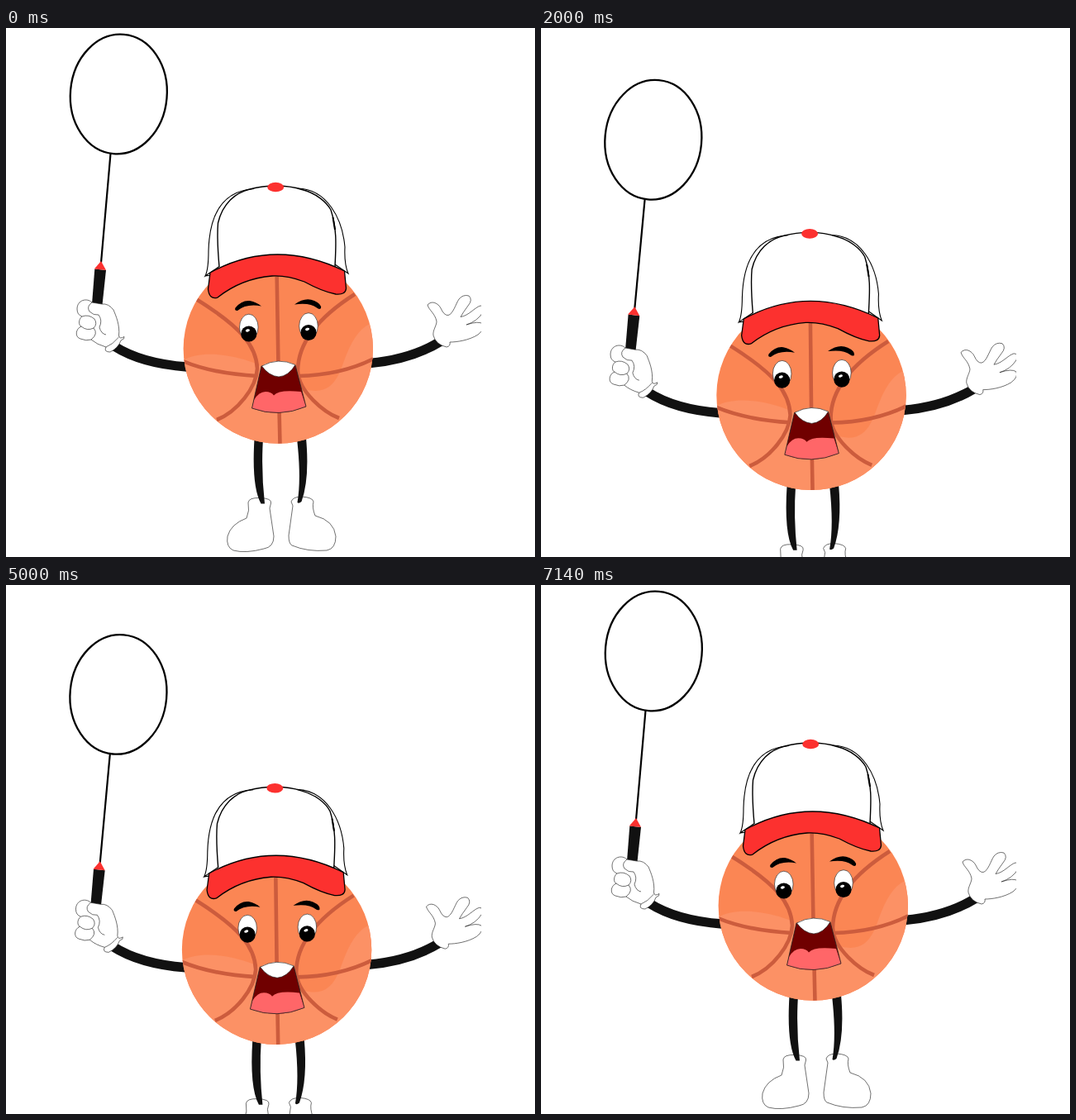
Recreate the animation shown at these times as an HTML page. Size 640 px wide and 640 px high, loop 7210 ms.

```html
<!DOCTYPE html>
<html lang="en">
<head>
<meta charset="utf-8">
<title>Basketball with a racket</title>
<style>
  html, body { margin: 0; width: 100%; height: 100%; overflow: hidden; background: #fff; }
  svg { display: block; width: 100%; height: 100%; }
  .thin { fill: #fff; stroke: #222; stroke-width: .65; }
  .limb { fill: none; stroke: #111; stroke-width: 11.5; }
  .seam { fill: none; stroke: #cc5c3d; stroke-width: 4.6; }
  .cap { fill: none; stroke: #000; stroke-width: 1.4; }
  .red { fill: #fc312f; }
  .dark { fill: #111; }
</style>
</head>
<body>
<svg viewBox="0 0 640 640">
  <defs>
    <clipPath id="stage"><rect width="575" height="640"/></clipPath>
    <clipPath id="round"><circle cx="329.3" cy="388" r="114.7"/></clipPath>
    <g id="eye">
      <ellipse class="thin" rx="11.3" ry="15.8"/>
      <circle cy="8" r="9.6"/>
      <ellipse cx="-2.4" cy="3.4" rx="2.6" ry="1.6" fill="#fff" transform="rotate(-15)"/>
    </g>
  </defs>
  <g clip-path="url(#stage)">
    <g id="figure">
      <!-- racket -->
      <ellipse cx="136.3" cy="80" rx="58.4" ry="72.4" transform="rotate(5 136.3 80)" fill="none" stroke="#000" stroke-width="2.3"/>
      <path d="M126.5 152 L115 284" stroke="#000" stroke-width="2.2"/>
      <path class="dark" d="M107.3 291.5 L121 293 L116.5 335 L104 334Z"/>
      <path class="red" d="M115 282 L106.8 291.5 L121 293Z"/>

      <!-- arms and hands -->
      <path class="limb" d="M131 385 Q164 406 219 410"/>
      <path class="limb" d="M440 405.5 Q490 401 526 379"/>
      <path class="thin" d="M104 332 C98 326 86 329 86 340 Q86 347 92 349 C87 353 88 360 91 361 C84 364 83 374 90 376 Q97 379 103 377 Q110 383 121 386 Q118 392 126 392 Q136 387 139 378 Q144 376 143 373.5 Q137 377 136.5 372 C138 360 133 348 130 341 Q124 333 116 334Z"/>
      <path class="thin" style="fill:none" d="M92 349 Q100 346 107 352 Q111 358 106 363 Q98 367 91 361 M106 363 Q112 370 103 377 M104 332 Q97 337 101 343 Q106 348 112 347 Q117 354 113 362 Q115 370 121 371 M121 386 Q129 383 136.5 374"/>
      <path class="thin" d="M517 372 C516 366 521 360 521 355 C519 345 512 342 510 335 C515 329 523 333 526 339 Q530 348 535 347.5 C541 346 544 334 548 328 Q553 322 560 324 Q565 329 559 336 Q553 344 550 349.5 C560 348 567 338 574 336 Q580 336 577 344 Q570 355 557 359 Q572 354 577 358 Q580 364 571 371 C560 378 545 380 537 380 Q538 385 533 386 Q520 383 517 372Z"/>

      <!-- shoes and legs -->
      <path class="thin" d="M293 574 Q294 568 307 568.5 Q322 569 320.5 575 L319 581 L324 615 Q324 628 312 630 Q290 636 275 632 Q266 628 268 615 Q272 600 291 593 Q295 584 293 574Z"/>
      <path class="thin" d="M345 573 Q347 567 358 567 Q371 568 372 573 Q370 580 374 590 Q397 596 399 615 Q399 630 388 632 Q365 634 346 626 Q342 624 342 614 L347 578Z"/>
      <path class="dark" d="M300.5 497 L311 497 Q308.5 535 313 575.5 L308.5 575.5 Q297 555 300.5 497Z"/>
      <path class="dark" d="M352 497 L363 496 Q367.5 545 357.5 573 Q354 576 352.5 574 Q357.500 545 352 497Z"/>

      <!-- ball -->
      <g clip-path="url(#round)">
        <rect x="214" y="273" width="231" height="231" fill="#fb8654"/>
        <path fill="#fc9165" d="M214 402 C235 390 270 394 300 405 C320 415 345 430 362 437 C400 448 405 410 412 395 Q425 362 445 356 V504 H214Z"/>
        <path class="seam" d="M327.500 290 L329.5 410 M330.500 460 L331.500 504 M230 328 C285 362 303 385 304 412 C303 435 280 464 255 474 M422 322 C378 350 353 380 353 415 C354 440 385 465 403 472 M214 403 Q250 418 304 421 M354 421 Q405 420 445 400"/>
      </g>

      <!-- face -->
      <use href="#eye" x="293.8" y="362"/>
      <use href="#eye" x="366" y="360.500"/>
      <path d="M277.5 338.500 Q285 329 295 330 Q303 331.500 309 336.500 Q291 333 280 342 Q276 342 277.5 338.500Z"/>
      <path d="M349 334.5 Q362 325 373 330 Q382 334 381 339 Q379 341 376 338.500 Q368 332 349 334.5Z"/>
      <path d="M309 409 L350 408 L363 458 Q330 472 297.500 460Z" fill="#700000"/>
      <path d="M300 450 Q306 440 314 440 Q321 440 324 444.500 Q330 437 357 440 L363 458 Q330 472 297.500 460Z" fill="#ff6668"/>
      <path d="M309 409 L350 408 L363 458 Q330 472 297.500 460Z" fill="none" stroke="#222" stroke-width=".8"/>
      <path class="thin" d="M309.5 409 Q329 398 350 407.500 Q342 421 330 422 Q318 421 309.5 409Z"/>

      <!-- cap -->
      <path fill="#fff" d="M241 300 Q245 292 245 270 C247 225 262 197 300 194.500 L326 191 L353 194 C388 195 407 230 410 265 Q409 285 414 297 Q325 252 241 300Z"/>
      <path class="cap" d="M258 289 Q255 255 256.500 236 C262 212 278 199 295 195 Q310 191 326 191 Q345 191 358 195.500 C376 200 388 211 393 220 C401 245 399 265 398 289"/>
      <path class="cap" style="stroke-width:1.1" d="M300 194.500 C262 197 246 225 245 270 Q245 292 241 300 L258 288.500 M241 300 L249 299 M353 194 C388 195 407 230 410 265 Q409 285 414 297 L398 286"/>
      <path d="M395.500 229 L398 244" stroke="#000" stroke-width="2"/>
      <path class="red" stroke="#000" stroke-width="1.3" d="M247 296 Q325 253 409.500 294 L411.500 315 Q411 323 399 322 Q383 319 361 307 Q340 299 322 300 Q285 303 256 326 Q246 329 244.500 316Z"/>
      <ellipse class="red" cx="326.200" cy="192.500" rx="10" ry="5.800"/>
    </g>
  </g>
</svg>
<script>
  const LOOP = 7210, STEPS = 101, TAU = 2 * Math.PI;
  const figure = document.getElementById('figure');

  // One loop holds two vertical bobs and three slightly skewed swings.
  const bob = phase => 57 * (1 - Math.cos(TAU * (2 * phase + .004))) / 2;
  const swing = phase => {
    const a = TAU * 3 * phase;
    return 2 * (.5 - .5 * Math.cos(a) + .12 * Math.sin(a) - .04 * Math.sin(2 * a));
  };

  function draw() {
    const time = performance.now() % LOOP;
    const step = Math.floor((time + 5) / (LOOP / STEPS)) % STEPS;
    const phase = step / (STEPS - 1);
    figure.setAttribute('transform', `translate(0 ${bob(phase)}) rotate(${swing(phase)} 40 0)`);
    requestAnimationFrame(draw);
  }
  draw();
</script>
</body>
</html>
```
